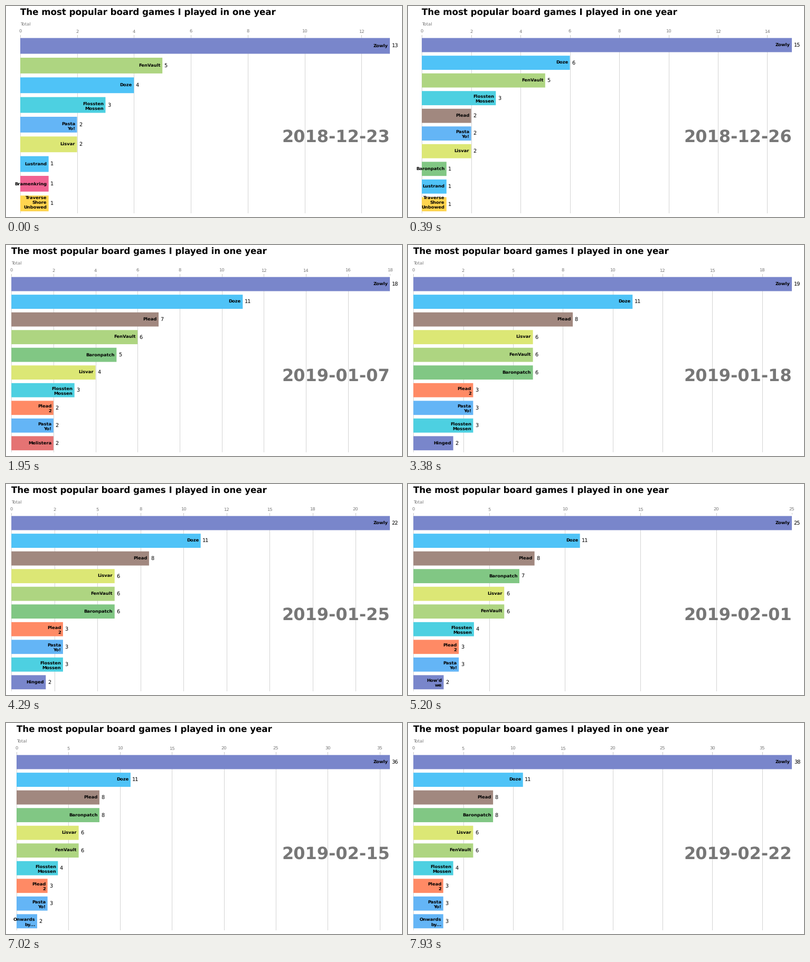
Recreate the animation shown at these times as a matplotlib script. Size 750 by 400 pixels, loop 8000 ms.

```python
import numpy as np
import matplotlib.pyplot as plt
from matplotlib import ticker
from matplotlib.animation import FuncAnimation

LOOP, STEP, DAY = 8000, 50, 130
START = np.datetime64("2018-12-23")
GREY = "#777777"

INDIGO, BLUE, SKY, CYAN = "#7986cb", "#64b5f6", "#4fc3f7", "#4dd0e1"
GREEN, LEAF, LIME, AMBER = "#81c784", "#aed581", "#dce775", "#ffd54f"
ORANGE, BROWN, RED, PINK = "#ff8a65", "#a1887f", "#e57373", "#f06292"

# name, colour, {day: plays} with steady growth between; order settles ties
GAMES = [
    ("Zowly", INDIGO, {0: 13, 7: 18, 23: 18, 40: 25, 56: 38}),
    ("Doze", SKY, {0: 4, 8: 11}),
    ("Plead", BROWN, {0: 0, 8: 6, 22: 8}),
    ("Plead\n2", ORANGE, {8: 0, 18: 3}),
    ("Pasta\nYo!", BLUE, {16: 2, 23: 3}),
    ("Lisvar", LIME, {0: 2, 8: 4, 26: 6}),
    ("FenVault", LEAF, {0: 5, 5: 6}),
    ("Baronpatch", GREEN, {0: 0, 8: 5, 47: 8}),
    ("Flossten\nMossen", CYAN, {0: 3, 34: 4}),
    ("Onwards\nby...", BLUE, {46: 0, 56: 3}),
    ("How'd\nwe", INDIGO, {30: 0, 38: 2}),
    ("Hinged", INDIGO, {16: 0, 24: 2}),
    ("Melistera", RED, {4: 0, 8: 2}),
    ("Lustrand", SKY, {4: 1, 5: 0}),
    ("Bramenkring", PINK, {2: 1, 3: 0}),
    ("Traverse\nShore\nUnbowed", AMBER, {0: 1}),
]

plt.rcParams.update({
    "font.family": "DejaVu Sans",
    "text.hinting": "none",
    "grid.linewidth": .4,
    "xtick.major.width": .4,
    "xtick.major.size": 1.75,
    "xtick.major.pad": 1.75,
})
fig, ax = plt.subplots(figsize=(7.5, 4), dpi=100)
shown = None


def ranking(day):
    rows = [(int(np.interp(day, list(keys), list(keys.values()))), name, color)
            for name, color, keys in GAMES]
    rows = [row for row in rows if row[0] > 0]
    return sorted(rows, key=lambda row: -row[0])[:10][::-1]


def draw_chart(day):
    ax.clear()
    fig.subplots_adjust(left=.125, right=.9, bottom=.11, top=.88)
    counts, names, colors = zip(*ranking(day))
    ax.barh(range(len(counts)), counts, color=colors, snap=False)
    dx = max(counts) / 200
    for i, (count, name) in enumerate(zip(counts, names)):
        drop = .3 if "\n" in name else .1
        ax.text(count - dx, i - drop, name, size=6, weight=600,
                ha="right", va="bottom")
        ax.text(count + dx, i, f"{count:,.0f}", size=7, ha="left", va="center")

    def label(x, y, text, **style):
        ax.text(x, y, text, transform=ax.transAxes, **style)

    label(1, .4, str(START + day), color=GREY, size=23, ha="right", weight=800)
    label(0, 1.06, "Total", color=GREY, size=6)
    label(0, 1.12, "The most popular board games I played in one year",
          size=12, weight=600)

    ax.xaxis.set_major_formatter(ticker.StrMethodFormatter("{x:,.0f}"))
    ax.xaxis.set_ticks_position("top")
    ax.tick_params(axis="x", colors=GREY, labelsize=6)
    ax.set_yticks([])
    ax.margins(0, .01)
    ax.grid(which="major", axis="x", linestyle="-")
    ax.set_axisbelow(True)
    ax.set_frame_on(False)
    fig.tight_layout(pad=.54)


def update(i):
    global shown
    day = (i * STEP + STEP - 10) // DAY
    if day != shown:
        draw_chart(day)
        shown = day
    return []


anim = FuncAnimation(fig, update, frames=LOOP // STEP, interval=STEP,
                     init_func=lambda: update(0), repeat=True, repeat_delay=0,
                     blit=False)
plt.show()
```
